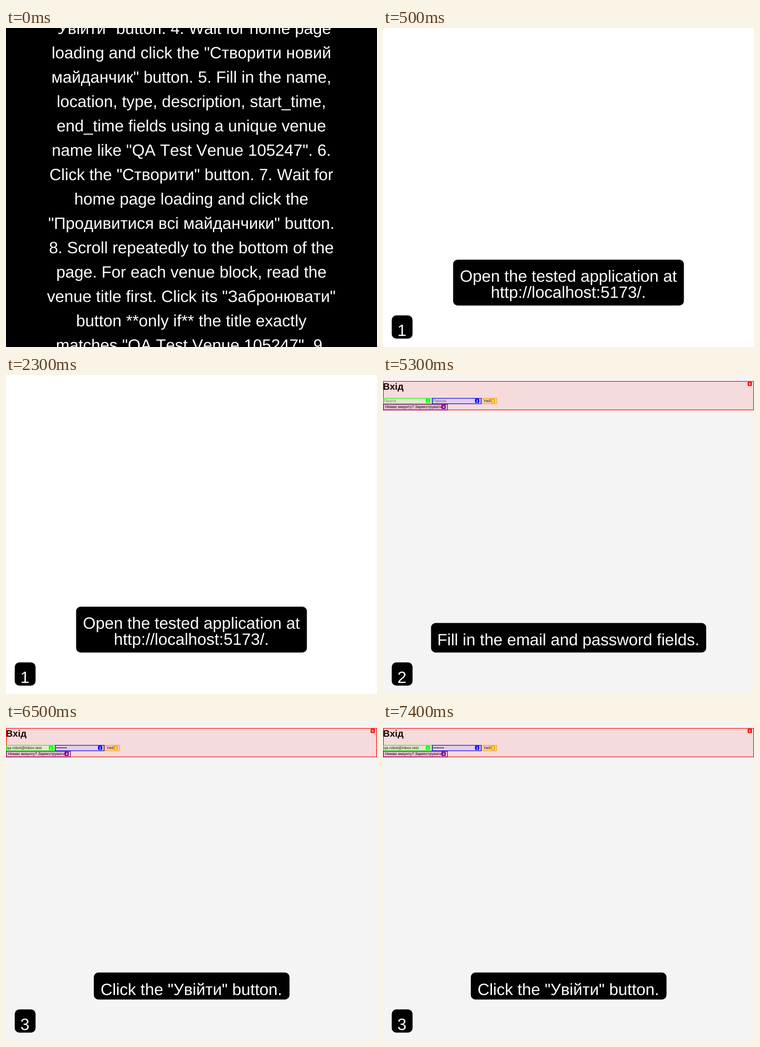
An HTML page that plays this animation: 807 by 694 pixels, repeating every 8000 ms.

```html
<!DOCTYPE html>
<html lang="en">
<head>
<meta charset="utf-8">
<style>
  html, body { margin: 0; width: 100%; height: 100%; overflow: hidden; background: #fff; }
  svg { display: block; width: 807px; height: 694px; font: 35.5px "Liberation Sans", Arial, sans-serif; }
  text { white-space: pre; font-kerning: none; text-rendering: geometricPrecision; }
  .mid { text-anchor: middle; }
  .small { font-size: 8.45px; }
  .badge { font-size: 7.6px; font-weight: bold; }
</style>
</head>
<body>
<svg id="stage" viewBox="0 0 807 694"></svg>
<script>
const LOOP = 8000;
const CENTER = 403.2;

const INTRO = [
  '"Увійти" button. 4. Wait for home page',
  'loading and click the "Створити новий',
  'майданчик" button. 5. Fill in the name,',
  'location, type, description, start_time,',
  'end_time fields using a unique venue',
  'name like "QA Test Venue 105247". 6.',
  'Click the "Створити" button. 7. Wait for',
  'home page loading and click the',
  '"Продивитися всі майданчики" button.',
  '8. Scroll repeatedly to the bottom of the',
  'page. For each venue block, read the',
  'venue title first. Click its "Забронювати"',
  'button **only if** the title exactly',
  'matches "QA Test Venue 105247". 9.',
];

const rect = (x, y, w, h, fill, extra = '') =>
  `<rect x="${x}" y="${y}" width="${w}" height="${h}" fill="${fill}" ${extra}/>`;
const text = (x, y, str, fill, cls = '', extra = '') =>
  `<text x="${x}" y="${y}" fill="${fill}" class="${cls}" ${extra}>${str}</text>`;
const centered = (lines, y, pitch) =>
  lines.map((line, i) => text(CENTER, y + i * pitch, line, '#fff', 'mid')).join('');

// Numbered element highlight: tinted outline with a badge at its top right
function highlight(index, x, y, w, h, color) {
  const right = x + w;
  return rect(x + .65, y + .65, w - 1.3, h - 1.3, color,
      `fill-opacity=".1" stroke="${color}" stroke-width="1.3"`)
    + rect(right - 13.8, y + 1.4, 9.2, 9.4, color, 'rx="2"')
    + text(right - 9.2, y + 8.8, index, '#fff', 'mid badge');
}

function loginPage(email, password, color) {
  return rect(0, 0, 807, 694, '#f4f4f4')
    + rect(0, 50, 214, 13, '#fff')
    + rect(214, 50, 34, 13, '#efefef')
    + rect(0, 63, 141, 13.5, '#efefef')
    + text(0, 31.7, 'Вхід', '#000', '', 'font-size="20.4" font-weight="bold"')
    + text(2, 59.4, email, color, 'small')
    + text(109, 59.4, password, color, 'small')
    + text(218.7, 59.4, 'Увійти', '#000', 'small')
    + text(4.7, 72.3, 'Немає акаунту? Зареєструватись', '#000', 'small')
    + highlight(0, 0, 13.2, 807, 63.4, '#f00')
    + highlight(1, 0, 50, 107, 13.2, '#0f0')
    + highlight(2, 107, 50, 107, 13.2, '#00f')
    + highlight(3, 214, 50, 34, 13.2, 'orange')
    + highlight(4, 0, 63.2, 141, 13.4, 'purple');
}

function caption(step, lines, x, y, w, baseline) {
  return rect(x, y, w, 603.7 - y, '#000', 'rx="10"')
    + centered(lines, baseline, 35)
    + rect(19, 625.3, 45.3, 50.5, '#000', 'rx="10"')
    + text(41, 669.7, step, '#fff', 'mid');
}

const scenes = [
  { start: 0, svg: rect(0, 0, 807, 694, '#000') + centered(INTRO, 13, 53) },
  { start: 500, svg: caption(1, ['Open the tested application at', 'http://localhost:5173/.'], 152.5, 504, 502, 552) },
  { start: 3500, svg: loginPage('Пошта', 'Пароль', '#757575')
      + caption(2, ['Fill in the email and password fields.'], 104.5, 539.5, 598.5, 587.5) },
  { start: 6500, svg: loginPage('qa.robot@inbox.test', '•'.repeat(8), '#000')
      + caption(3, ['Click the "Увійти" button.'], 191, 545, 425.7, 593.5) },
];

const stage = document.getElementById('stage');
let shown;

function draw() {
  const t = performance.now() % LOOP;
  const scene = scenes.findLast(s => s.start <= t);
  if (scene !== shown) {
    stage.innerHTML = scene.svg;
    shown = scene;
  }
  requestAnimationFrame(draw);
}
draw();
</script>
</body>
</html>
```
